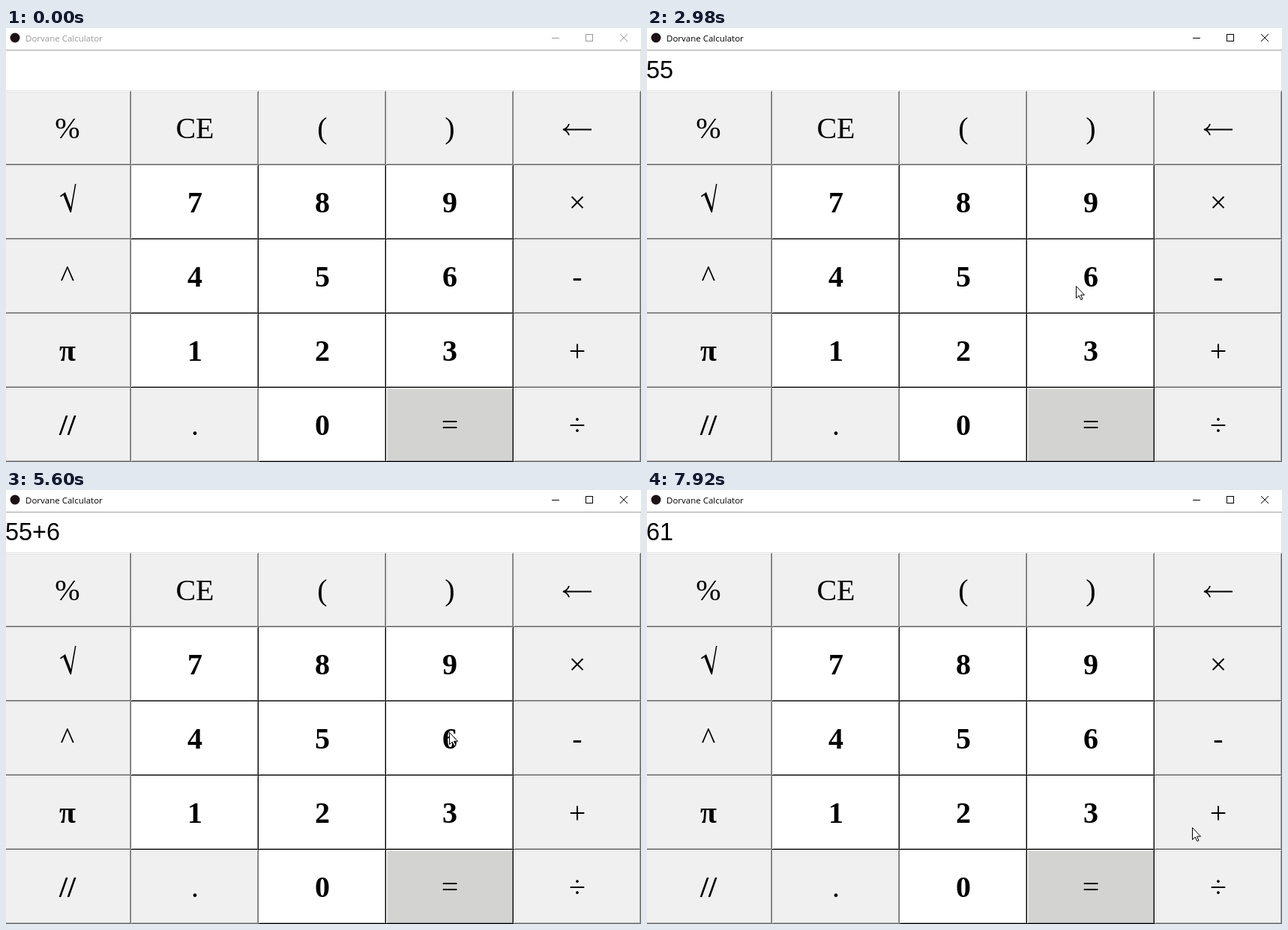
An HTML page for the animation above (7.99 s loop, 847 by 579 pixels).

```html
<!DOCTYPE html>
<html lang="en">
<head>
<meta charset="utf-8">
<title>Calculator</title>
<style>
  html, body { margin: 0; width: 847px; height: 579px; overflow: hidden; background: #fff; }
  svg { display: block; }
  .key text { font: 40px "Liberation Serif", "Times New Roman", serif; text-anchor: middle; }
  .key .bold { font-weight: bold; }
  #title { font: 11.5px "Open Sans", "Segoe UI", sans-serif; }
  #display { font: 32.4px "Liberation Sans", Arial, sans-serif; }
</style>
</head>
<body>
<svg width="847" height="579" viewBox="0 0 847 579">
  <rect width="847" height="579" fill="#fff"/>
  <circle cx="12" cy="13" r="6.5" fill="#1c1214"/>
  <g id="bar">
    <text id="title" x="26" y="18" fill="currentColor">Dorvane Calculator</text>
    <path d="M728 13.5h10M773.5 8.5h9v9h-9z" fill="none" stroke="currentColor" shape-rendering="crispEdges"/>
    <path d="M819 8l10 10M829 8l-10 10" fill="none" stroke="currentColor"/>
  </g>
  <rect y="29" width="847" height="1" fill="#a0a0a0"/>
  <path d="M846 30h1v54H0v-1h846z" fill="#e3e3e3"/>
  <text id="display" x="-1" y="67"></text>
  <g id="keys"></g>
  <path id="cursor" d="M.5.5V16.5L4.2 13L6.8 18.5L9 17.5L6.5 12.2H11.5Z" fill="#fff" stroke="#000"/>
</svg>
<script>
const LOOP = 7990, TICK = 77;
const KEY_W = 170, KEY_H = 99;
const $ = id => document.getElementById(id);

const rows = ['% CE ( ) ←', '√ 7 8 9 ×', '^ 4 5 6 -', 'π 1 2 3 +', '// . 0 = ÷'];

// Long arrow and tall root, which the serif font draws too small
const icons = {
  '←': '<path d="M66 51.5h38M74 44q-2 6-8 7.5q6 1.5 8 7.5" fill="none" stroke="#000" stroke-width="1.8"/>',
  '√': '<path d="M75 41L82 36L89.5 56L95 25H96.5L90 63H88.5L79.5 40L75.8 42.5Z"/>'
};

const easeIn = p => s => s ** p;
const easeOut = p => s => 1 - (1 - s) ** p;
const smooth = s => s * s * (3 - 2 * s);

// The pointer rests at each stop until the next one starts
const home = { x: 764, y: 592 };
const stops = [
  { start: 200, end: 970, x: 438, y: 356, ease: easeOut(2) },
  { start: 1040, end: 1510, x: 426, y: 328, ease: easeOut(1.3) },
  { start: 2820, end: 3130, x: 1100, y: 400, ease: easeIn(3) },
  { start: 3360, end: 3510, x: 761, y: 430, ease: easeOut(4) },
  { start: 4290, end: 4990, x: 591, y: 323, ease: smooth },
  { start: 5980, end: 6460, x: 607, y: 519, ease: smooth },
  { start: 7530, end: 7920, x: 727, y: 450, ease: smooth }
];

const click = (label, down, hold = 150) => ({ label, down, up: down + hold });
const clicks = [
  click('5', 1970, 70), click('5', 2520), click('+', 3910), click('6', 5450), click('=', 6690)
];

const sum = text => String(text.split('+').reduce((total, part) => total + Number(part), 0));
const type = (text, { label }) => label === '=' ? sum(text) : text + label;

function bevel(i, light, dark) {
  const w = KEY_W - i, h = KEY_H - i;
  return `<path d="M${i} ${i}H${w - 1}V${i + 1}H${i + 1}V${h - 1}H${i}z" fill="${light}"/>` +
    `<path d="M${w} ${i}V${h}H${i}V${h - 1}H${w - 1}V${i}z" fill="${dark}"/>`;
}

function keyMarkup(label, pressed) {
  const digit = /\d/.test(label);
  const plain = pressed || !(digit || label === '=');
  const face = plain ? '#f0f0f0' : digit ? '#fff' : '#d3d3d2';
  const inner = plain ? '#a0a0a0' : digit ? '#999' : '#7f7f7f';
  const outer = plain ? '#696969' : '#000';
  const glow = digit && !pressed ? '#fff' : '#e3e3e3';
  const edges = pressed
    ? bevel(0, inner, '#fff') + bevel(1, outer, glow)
    : bevel(0, '#fff', outer) + bevel(1, glow, inner);
  const shift = pressed ? 2 : 0;
  const bold = digit || label === 'π' || label === '//';
  const mark = icons[label] ||
    `<text class="${bold ? 'bold' : ''}" x="${85 + shift}" y="${63 + shift}">${label}</text>`;
  return `<rect width="${KEY_W}" height="${KEY_H}" fill="${face}"/>${edges}${mark}`;
}

const keys = rows.flatMap((row, r) => row.split(' ').map((label, c) => {
  const g = document.createElementNS('http://www.w3.org/2000/svg', 'g');
  g.setAttribute('class', 'key');
  g.setAttribute('transform', `translate(${c * KEY_W - 3} ${84 + r * KEY_H})`);
  $('keys').append(g);
  return { g, label, pressed: null };
}));

function drawKey(key, pressed) {
  if (key.pressed === pressed) return;
  key.pressed = pressed;
  key.g.innerHTML = keyMarkup(key.label, pressed);
}

// The pointer jumps once per tick, like a screen recording
function pointerAt(t) {
  const i = stops.filter(s => t >= s.start).length - 1;
  if (i < 0) return home;
  const from = stops[i - 1] || home, to = stops[i];
  const span = to.end - to.start;
  const steps = Math.round(span / TICK) + 1;
  const step = Math.min(steps, 1 + Math.floor((t - to.start) / span * (steps - 1)));
  const e = to.ease(step / steps);
  const mix = axis => Math.round(from[axis] + (to[axis] - from[axis]) * e);
  return { x: mix('x'), y: mix('y') };
}

function render(t) {
  $('bar').style.color = t >= clicks[0].down ? '#000' : '#999';
  $('display').textContent = clicks.filter(c => t >= c.up).reduce(type, '');
  const held = clicks.find(c => t >= c.down && t < c.up);
  keys.forEach(key => drawKey(key, held?.label === key.label));
  const { x, y } = pointerAt(t);
  $('cursor').setAttribute('transform', `translate(${x} ${y})`);
}

const began = performance.now();
function tick() {
  render((performance.now() - began) % LOOP);
  requestAnimationFrame(tick);
}
tick();
</script>
</body>
</html>
```
